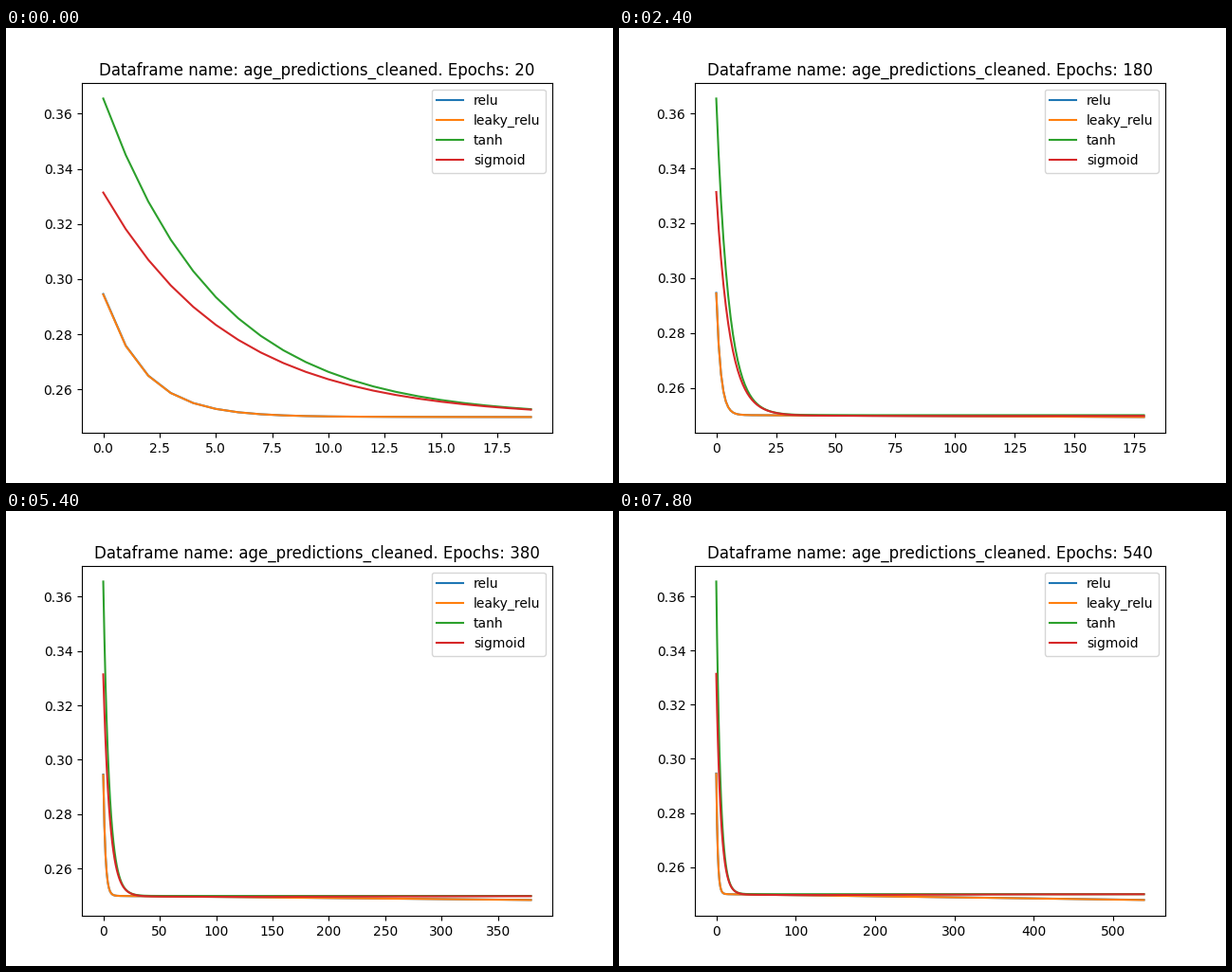
Animation, 640 px wide and 480 px high, one loop 8 s. Source, as a matplotlib script:

```python
import numpy as np
import matplotlib.pyplot as plt
from matplotlib.animation import FuncAnimation

INTERVAL = 100        # ms per animation tick
TICKS = 80            # one loop lasts 8000 ms
TICKS_PER_STEP = 3    # the plot grows every 300 ms
EPOCH_STEP = 20
BASE = 0.25


def decay(x, start, ratio):
    return BASE + start * ratio ** x


def drift(x, slope):
    return slope * np.maximum(x - 12, 0)


def dip(x, depth, peak):
    return depth * x / peak * np.exp(1 - x / peak)


LOSSES = {
    "relu": lambda x: decay(x, 0.0446, 0.58) - drift(x, 4.0e-6),
    "leaky_relu": lambda x: decay(x, 0.0444, 0.58) - drift(x, 4.1e-6),
    "tanh": lambda x: decay(x, 0.1155, 0.8225),
    "sigmoid": lambda x: decay(x, 0.0814, 0.837) - dip(x, 0.0003, 110),
}

fig, ax = plt.subplots(figsize=(6.4, 4.8), dpi=100)
lines = {name: ax.plot([], [], label=name)[0] for name in LOSSES}
ax.legend(loc="upper right")


def draw(tick):
    epochs = EPOCH_STEP * (1 + tick // TICKS_PER_STEP)
    x = np.arange(epochs)
    for name, loss in LOSSES.items():
        lines[name].set_data(x, loss(x))
    ax.relim()
    ax.autoscale_view()
    ax.set_title(f"Dataframe name: age_predictions_cleaned. Epochs: {epochs}")
    return list(lines.values())


anim = FuncAnimation(fig, draw, frames=TICKS, init_func=lambda: draw(0),
                     interval=INTERVAL, repeat=True, repeat_delay=0)
plt.show()
```
